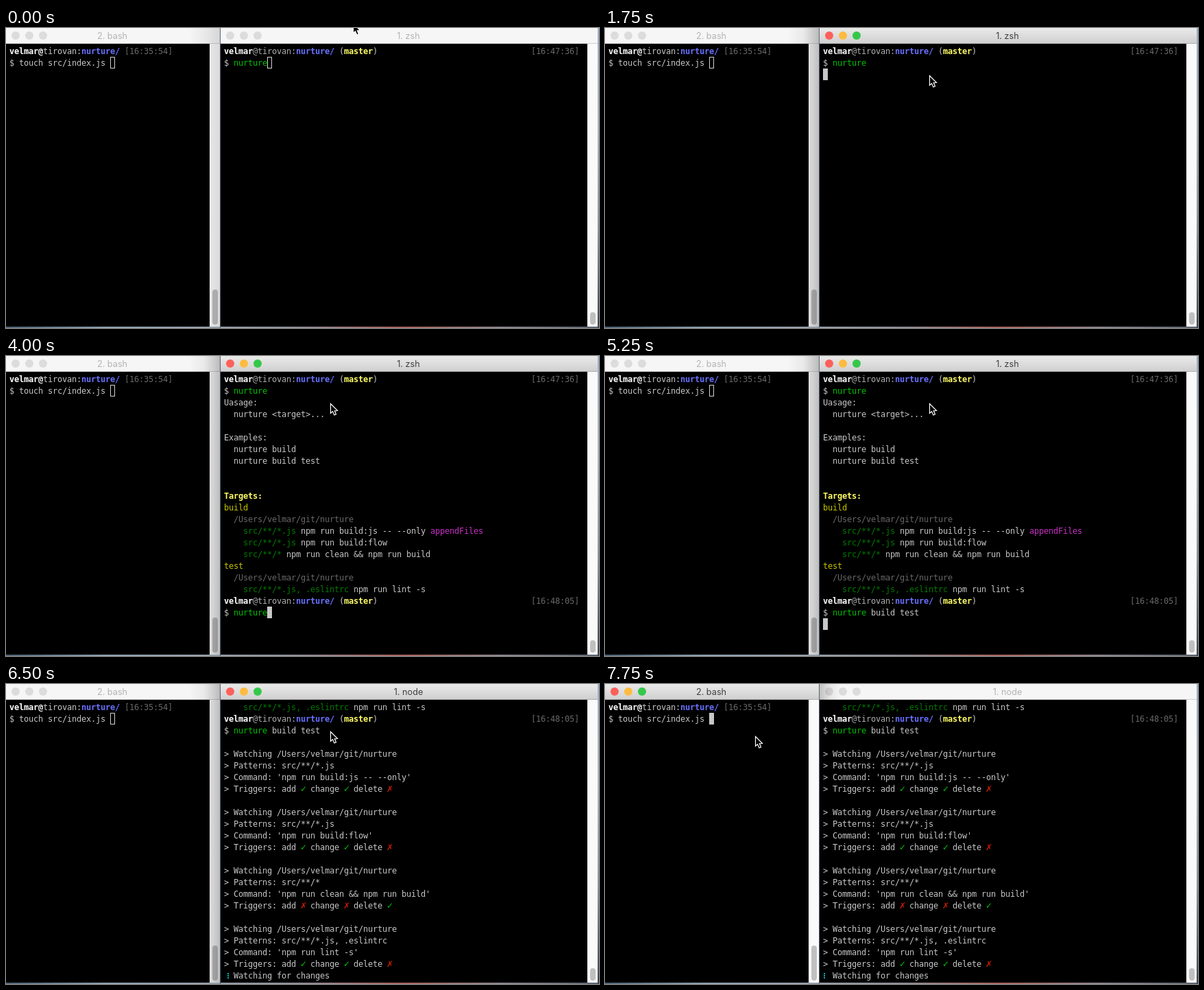
Animation, 865 px wide and 437 px high, one loop 8 s. Source, as an HTML page with a canvas:

```html
<!DOCTYPE html>
<html>
<head>
<meta charset="utf-8">
<title>Terminals</title>
<style>
html, body { margin: 0; width: 100%; height: 100%; overflow: hidden; background: #8796a8; }
canvas { display: block; }
</style>
</head>
<body>
<canvas id="stage" width="865" height="437"></canvas>
<script>
const ctx = document.getElementById('stage').getContext('2d');
const LOOP = 8000, COL = 7, ROW = 17, TOP = 25;
const MONO = '12px "DejaVu Sans Mono", monospace';

// Text style letters: capitals W, B, Y are bold
const COLORS = {
  w: '#c7c7c7', W: '#ffffff', B: '#6871ff', Y: '#fffc67', y: '#c7c400',
  d: '#686868', h: '#b0b0b0', g: '#00c200', G: '#007c00', m: '#ca30c7', r: '#c91b00'
};

const prompt = time =>
  '`Wvelmar`h@tirovan:`Bnurture/ `w(`Ymaster`w)' + ' '.repeat(32) + `\`d[${time}]`;

const usage = [
  'Uasage:', '  nurture <target>...', '',
  'Examples:', '  nurture build', '  nurture build test', '', '',
  '`YTargets:', '`ybuild', '`d  /Users/velmar/git/nurture',
  '`G    src/**/*.js `wnpm run build:js -- --only `mappendFiles',
  '`G    src/**/*.js `wnpm run build:flow',
  '`G    src/**/* `wnpm run clean && npm run build',
  '`ytest', '`d  /Users/velmar/git/nurture',
  '`G    src/**/*.js, .eslintrc `wnpm run lint -s'
];

const mark = on => on ? '`g✓`w' : '`r✗`w';
const watch = (patterns, command, add, change, del) => [
  '', '> Watching /Users/velmar/git/nurture', '> Patterns: ' + patterns,
  `> Command: '${command}'`,
  `> Triggers: add ${mark(add)} change ${mark(change)} delete ${mark(del)}`
];

const watching = [
  usage[usage.length - 1], prompt('16:48:05'), '$ `gnurture`w build test',
  ...watch('src/**/*.js', 'npm run build:js -- --only', 1, 1, 0),
  ...watch('src/**/*.js', 'npm run build:flow', 1, 1, 0),
  ...watch('src/**/*', 'npm run clean && npm run build', 0, 0, 1),
  ...watch('src/**/*.js, .eslintrc', 'npm run lint -s', 1, 1, 0),
  '  Watching for changes'
];

const first = [prompt('16:47:36'), '$ `gnurture'];
const leftLines = ['`Wvelmar@`wtirovan:`Bnurture/ `d[16:35:54]', '$ touch src/index.js '];

function rect(x, y, w, h, fill) {
  ctx.fillStyle = fill;
  ctx.fillRect(x, y, w, h);
}

function gradient(x0, y0, x1, y1, ...colors) {
  const g = ctx.createLinearGradient(x0, y0, x1, y1);
  colors.forEach((c, i) => g.addColorStop(i / (colors.length - 1), c));
  return g;
}

function drawLine(line, x, row) {
  let style = 'w', col = 0;
  for (let i = 0; i < line.length; i++) {
    if (line[i] === '`') { style = line[++i]; continue; }
    const ch = line[i], tick = ch === '✓' || ch === '✗';
    ctx.font = tick ? '12px "DejaVu Sans", sans-serif'
      : ('WBY'.includes(style) ? 'bold ' : '') + MONO;
    ctx.fillStyle = COLORS[style];
    ctx.fillText(ch, x + col++ * COL - (tick ? 1 : 0), TOP + row * ROW + 13);
  }
}

function drawCaret(x, col, row, solid) {
  const px = x + col * COL, py = TOP + row * ROW;
  if (solid) return rect(px, py, COL, ROW, '#c7c7c7');
  ctx.strokeStyle = '#d0d0d0';
  ctx.lineWidth = 1;
  ctx.strokeRect(px + .5, py + .5, COL - 1, ROW - 1);
}

function drawWindow(x, w, title, active, thumbTop) {
  rect(x, 0, w, 22, active ? gradient(0, 0, 0, 22, '#eaeaea', '#d0d0d0') : '#f6f6f6');
  rect(x, 22, w, 1, active ? '#adadad' : '#d0d0d0');
  rect(x, 23, w - 15, 412, '#000');
  rect(x + w - 15, 23, 15, 412, '#fafafa');
  ctx.fillStyle = '#c0c0c0';
  ctx.beginPath();
  ctx.roundRect(x + w - 11, thumbTop, 8, 432 - thumbTop, 4);
  ctx.fill();
  ['#fc605b', '#fdbc40', '#34c84a'].forEach((c, i) => {
    ctx.fillStyle = active ? c : '#dcdcdc';
    ctx.beginPath();
    ctx.arc(x + 14 + 20 * i, 11, 6, 0, 7);
    ctx.fill();
  });
  ctx.font = '12.7px Inter, sans-serif';
  ctx.fillStyle = active ? '#404040' : '#b4b4b4';
  ctx.textAlign = 'center';
  ctx.fillText(title, Math.floor(x + w / 2) - 1, 16);
  ctx.textAlign = 'left';
}

function drawDesktop() {
  rect(0, 0, 865, 437, '#8796a8');
  rect(0, 435, 865, 2, gradient(0, 0, 865, 0, '#4d6273', '#8fa0ad', '#98a2ac', '#8d8d96', '#a8625c', '#8a858c', '#5c6470'));
  rect(863, 0, 2, 437, gradient(0, 0, 0, 437, '#9fb2c8', '#a9b6c4', '#8b96a4', '#3c4350'));
}

function drawSpinner(step) {
  const bits = '⠋⠙⠹⠸⠼⠴⠦⠧⠇⠏'.charCodeAt((1 + 3 * step) % 10) - 0x2800;
  for (let i = 0; i < 6; i++)
    if (bits >> i & 1) rect(319 + 4 * Math.floor(i / 3), 421 + 3 * (i % 3), 2, 2, '#00b5c4');
}

function drawPointer(x, y) {
  ctx.save();
  ctx.translate(x + .5, y + .5);
  ctx.beginPath();
  [[0, 0], [0, 14], [3, 11.3], [5.4, 16.5], [8, 15.4], [5.8, 10.3], [10, 10]]
    .forEach(p => ctx.lineTo(...p));
  ctx.closePath();
  ctx.fillStyle = '#000';
  ctx.fill();
  ctx.strokeStyle = '#fff';
  ctx.lineWidth = 1.2;
  ctx.stroke();
  ctx.restore();
}

// Right terminal: lines and caret [column, row]
function session(t) {
  if (t < 2000) return { lines: first, caret: t < 1750 ? [9, 1] : [0, 2] };
  if (t >= 5500) return { lines: watching };
  const typed = t < 4000 ? '' : t < 4500 ? 'nurture' : 'nurture`w build test';
  const caret = t < 4000 ? [2, 20] : t < 4500 ? [9, 20] : t < 5250 ? [20, 20] : [0, 21];
  return { lines: [...first, ...usage, prompt('16:48:05'), '$ `g' + typed], caret };
}

function pointerAt(t) {
  if (t < 250) return [506, -7];
  if (t < 7000) return [473, 69];
  if (t < 7250) return [257, 11];
  return t < 7500 ? [221, 74] : [219, 76];
}

function draw(t) {
  const leftActive = t >= 7500, rightActive = t >= 500 && !leftActive;
  drawDesktop();
  drawWindow(0, 312, '2. bash', leftActive, 381);
  drawWindow(313, 550, t < 5750 ? '1. zsh' : '1. node', rightActive, 414);
  rect(312, 0, 1, 437, '#586472');

  // Shadow of the front window on its neighbour
  if (leftActive) rect(313, 0, 32, 435, gradient(313, 0, 345, 0, 'rgba(0,0,0,.22)', 'rgba(0,0,0,.06)', 'rgba(0,0,0,0)'));
  else rect(266, 0, 46, 435, gradient(266, 0, 312, 0, 'rgba(0,0,0,0)', 'rgba(0,0,0,.05)', rightActive ? 'rgba(0,0,0,.24)' : 'rgba(0,0,0,.13)'));

  leftLines.forEach((line, i) => drawLine(line, 5, i));
  drawCaret(5, 21, 1, leftActive);

  const { lines, caret } = session(t);
  lines.forEach((line, i) => drawLine(line, 318, i));
  if (caret) drawCaret(318, ...caret, rightActive);
  else drawSpinner(Math.floor((t - 5500) / 250));

  drawPointer(...pointerAt(t));
}

const start = performance.now();
function tick() {
  draw((performance.now() - start) % LOOP);
  requestAnimationFrame(tick);
}
tick();
</script>
</body>
</html>
```
